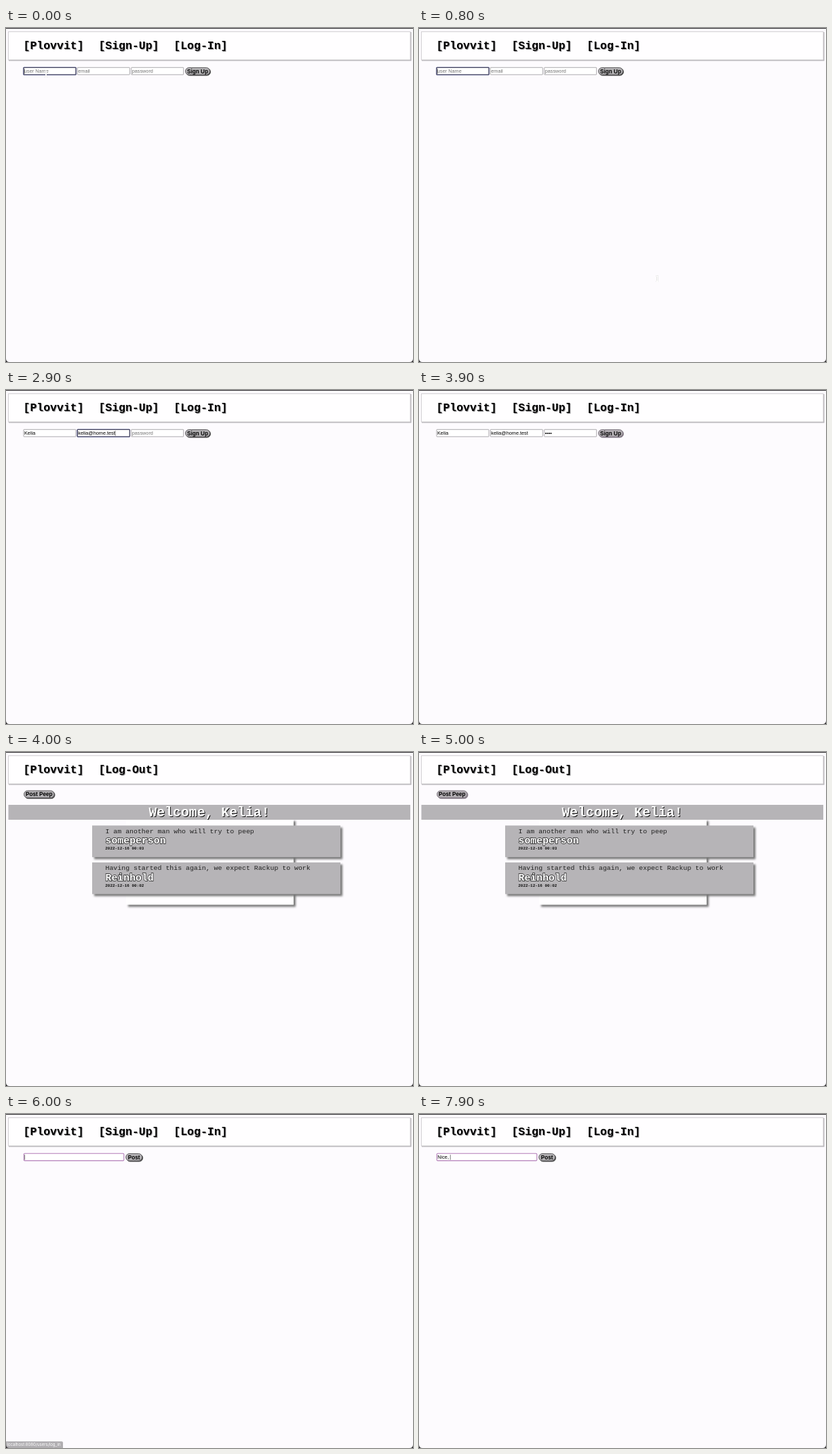
An HTML page that plays this animation: 600 by 493 pixels, repeating every 8000 ms.

```html
<!DOCTYPE html>
<html lang="en">
<head>
<meta charset="utf-8">
<title>Sign up and post</title>
<style>
  html, body { margin: 0; width: 100%; height: 100%; overflow: hidden; background: #fdfbfe; }
  svg { display: block; width: 100vw; height: 100vh; }
  text { white-space: pre; }
  .mono { font-family: "Liberation Mono", "Courier New", monospace; }
  .sans { font-family: "Liberation Sans", Arial, sans-serif; }
  .bold { font-weight: 700; }
  .header { fill: #fffeff; stroke: #d2d0d3; filter: drop-shadow(1.5px 1.5px .7px #aeacaf); }
  .link { font-size: 16.5px; filter: drop-shadow(1.4px 1.4px .7px #9a989b); }
  .linkRing { fill: none; stroke: #a45fae; stroke-width: 1.3; }
  .box { fill: #fff; stroke: #98969a; stroke-width: .8; }
  .focused .box { stroke: #45455e; stroke-width: 1.3; filter: drop-shadow(0 0 .7px #6470c8); }
  .focused.accent .box { stroke: #b27cb8; stroke-width: 1.1; filter: none; }
  .value { font-size: 7.3px; }
  .caret { stroke: #222; stroke-width: .6; }
  .button rect { fill: #b2b0b3; stroke: #565457; stroke-width: .9; filter: drop-shadow(1.1px 1.1px .5px #444); }
  .button.focused rect { fill: #b3aeb3; stroke: #77707a; filter: drop-shadow(1.3px 1px .6px #857a87); }
  .button text { font-size: 8.2px; text-anchor: middle; }
  .panel { fill: #fffeff; filter: drop-shadow(3px 3px 1.8px #777); }
  .card rect { fill: #b6b4b7; filter: drop-shadow(3px 3px 1.8px #777); }
  .body { font-size: 9.9px; fill: #222; }
  .author { font-size: 14.85px; fill: #fff; stroke: #3a3a3a; stroke-width: 1.3; paint-order: stroke; filter: drop-shadow(.7px .7px .4px #333); }
  .date { font-size: 5.94px; fill: #111; }
  .welcome { font-size: 19.8px; fill: #fff; text-anchor: middle; filter: drop-shadow(1.3px 1.3px .3px #111); }
  .status text { font-size: 6px; fill: #fff; font-family: Inter, sans-serif; }
</style>
</head>
<body>
<svg viewBox="0 0 600 493">
  <rect width="600" height="493" fill="#fdfbfe"/>
  <rect width="600" height="1" fill="#29272a"/>
  <rect class="header" x="3.5" y="5.5" width="592.5" height="41.5"/>

  <g class="mono bold">
    <text class="link" x="25.5" y="31">[Plovvit]</text>
    <g id="guestLinks">
      <text class="link" x="136.4" y="31">[Sign-Up]</text>
      <text class="link" x="247.3" y="31">[Log-In]</text>
    </g>
    <text class="link" id="logOut" x="136.4" y="31">[Log-Out]</text>
  </g>
  <rect class="linkRing" id="linkRing" y="5" height="42" rx="1.5"/>

  <g id="signUpPage" class="sans"></g>

  <g id="feedPage">
    <g id="feedForm" class="sans"></g>
    <rect class="panel" x="177" y="99" width="247" height="126.5"/>
    <rect x="3.5" y="78" width="592.5" height="22" fill="#b6b4b7"/>
    <text class="mono bold welcome" x="299.5" y="95">Welcome, Kelia!</text>
    <g class="card mono">
      <rect x="127" y="108.5" width="366" height="46.7"/>
      <text class="body" x="146.5" y="119.7">I am another man who will try to peep</text>
      <text class="author bold" x="146.5" y="135">someperson</text>
      <text class="date bold" x="146.3" y="144">2022-12-16 00:03</text>
    </g>
    <g class="card mono" transform="translate(0 54.5)">
      <rect x="127" y="108.5" width="366" height="46.7"/>
      <text class="body" x="146.5" y="119.7">Having started this again, we expect Rackup to work</text>
      <text class="author bold" x="146.5" y="135">Reinhold</text>
      <text class="date bold" x="146.3" y="144">2022-12-16 00:02</text>
    </g>
  </g>

  <g id="postPage" class="sans"></g>

  <g class="status" id="status">
    <path id="statusBar" fill="#b0aeb1"/>
    <text id="statusText" x="1.5" y="490.2"></text>
  </g>
  <path d="M0 488Q0 493 5 493H0ZM600 488Q600 493 595 493H600Z" fill="#29272a"/>
  <path id="pointer" d="M-1.5-4Q0-4 0-3V3Q0 4-1.5 4M1.5-4Q0-4 0-3M0 3Q0 4 1.5 4" fill="none" stroke="#fff" stroke-width="1.8" style="filter:drop-shadow(0 0 .5px #999)"/>
</svg>

<script>
const LOOP = 8000, STEP = 100;
const byId = id => document.getElementById(id);
const show = (node, on) => { node.style.display = on ? '' : 'none'; };
const within = (t, from, to) => t >= from && t < to;

function add(parent, tag, attrs, text = '') {
  const node = document.createElementNS('http://www.w3.org/2000/svg', tag);
  for (const key in attrs) node.setAttribute(key, attrs[key]);
  node.textContent = text;
  return parent.appendChild(node);
}

function makeField(page, { x, width, hint = '', text, times, focus, accent = '' }) {
  const group = add(byId(page), 'g', {});
  add(group, 'rect', { class: 'box', x: x + .5, y: 58.3, width: width - 1, height: 10.6, rx: accent ? 1.2 : .6 });
  const value = add(group, 'text', { class: 'value', x: x + 1.5, y: 66.3 });
  const caret = add(group, 'path', { class: 'caret' });
  return t => {
    const typed = text.slice(0, times.filter(time => time <= t).length);
    const focused = within(t, ...focus);
    value.textContent = typed || hint;
    value.setAttribute('fill', typed ? '#000' : '#757575');
    group.setAttribute('class', focused ? 'focused ' + accent : '');
    show(caret, focused && !within(t, 6600, 6900));
    const caretX = x + 1.8 + (typed ? value.getComputedTextLength() : 0);
    caret.setAttribute('d', `M${caretX} 60.2V67.6`);
  };
}

function makeButton(page, x, y, width, label, focus) {
  const group = add(byId(page), 'g', {});
  add(group, 'rect', { x: x + .5, y: y + .5, width: width - 1, height: 10.6, rx: 5.3 });
  add(group, 'text', { class: 'bold', x: x + width / 2, y: y + 8.6 }, label);
  return t => group.setAttribute('class', within(t, ...focus) ? 'button focused' : 'button');
}

const widgets = [
  makeField('signUpPage', { x: 25.5, width: 78, hint: 'user Name', text: 'Kelia',
    times: [1000, 1100, 1300, 1300, 1300], focus: [0, 1500] }),
  makeField('signUpPage', { x: 104.8, width: 78, hint: 'email', text: 'kelia@home.test',
    times: [1700, 1800, 1900, 2000, 2100, 2300, 2500, 2500, 2600, 2600, 2700, 2800, 2800, 2900, 2900],
    focus: [1500, 3100] }),
  makeField('signUpPage', { x: 184.2, width: 78, hint: 'password', text: '••••',
    times: [3300, 3400, 3500, 3600], focus: [3100, 3800] }),
  makeButton('signUpPage', 264, 58, 37, 'Sign Up', [3800, 4000]),
  makeButton('feedForm', 26, 56.6, 45.5, 'Post Peep', [4900, 5300]),
  makeField('postPage', { x: 25.8, width: 148.5, text: 'Nice, ',
    times: [7100, 7200, 7400, 7500, 7700, 7900], focus: [6000, LOOP], accent: 'accent' }),
  makeButton('postPage', 176.2, 58, 25, 'Post', [0, 0]),
];

// Keyboard focus on header links: from, to, ring left, ring width, address
const linkStops = [
  [4700, 4900, 15, 112, 'localhost:8080/'],
  [5700, 5800, 15, 112, 'localhost:8080/'],
  [5800, 5900, 126, 112, 'localhost:8080/users/new'],
  [5900, 6000, 237, 102, 'localhost:8080/users/log_in'],
];

function drawLinks(t) {
  const stop = linkStops.find(([from, to]) => within(t, from, to));
  const ring = byId('linkRing');
  show(ring, stop);
  if (stop) {
    ring.setAttribute('x', stop[2]);
    ring.setAttribute('width', stop[3]);
  }
  const visible = within(t, 4800, 5000) || within(t, 5700, 6400);
  show(byId('status'), visible);
  if (!visible) return;
  const [, , , , address] = linkStops.filter(([from]) => from <= t).pop();
  byId('statusText').textContent = address;
  const right = byId('statusText').getComputedTextLength() + 5;
  byId('statusBar').setAttribute('d', `M0 483.3H${right - 2}q2 0 2 2V493H0Z`);
  byId('status').style.opacity = Math.min(1, (6400 - t) / 300);
}

function drawPointer(t) {
  show(byId('pointer'), t < 900);
  const p = Math.min(1, t / 900);
  const x = 59 + 370 * p * p, y = 68 + 430 * p * p * p;
  byId('pointer').setAttribute('transform', `translate(${x} ${y})`);
}

function draw() {
  const t = Math.floor(performance.now() % LOOP / STEP) * STEP;
  const onFeed = within(t, 4000, 5300);
  show(byId('signUpPage'), t < 4000);
  show(byId('feedPage'), onFeed);
  show(byId('postPage'), t >= 5300);
  show(byId('guestLinks'), !onFeed);
  show(byId('logOut'), onFeed);
  widgets.forEach(update => update(t));
  drawLinks(t);
  drawPointer(t);
  requestAnimationFrame(draw);
}
draw();
</script>
</body>
</html>
```
